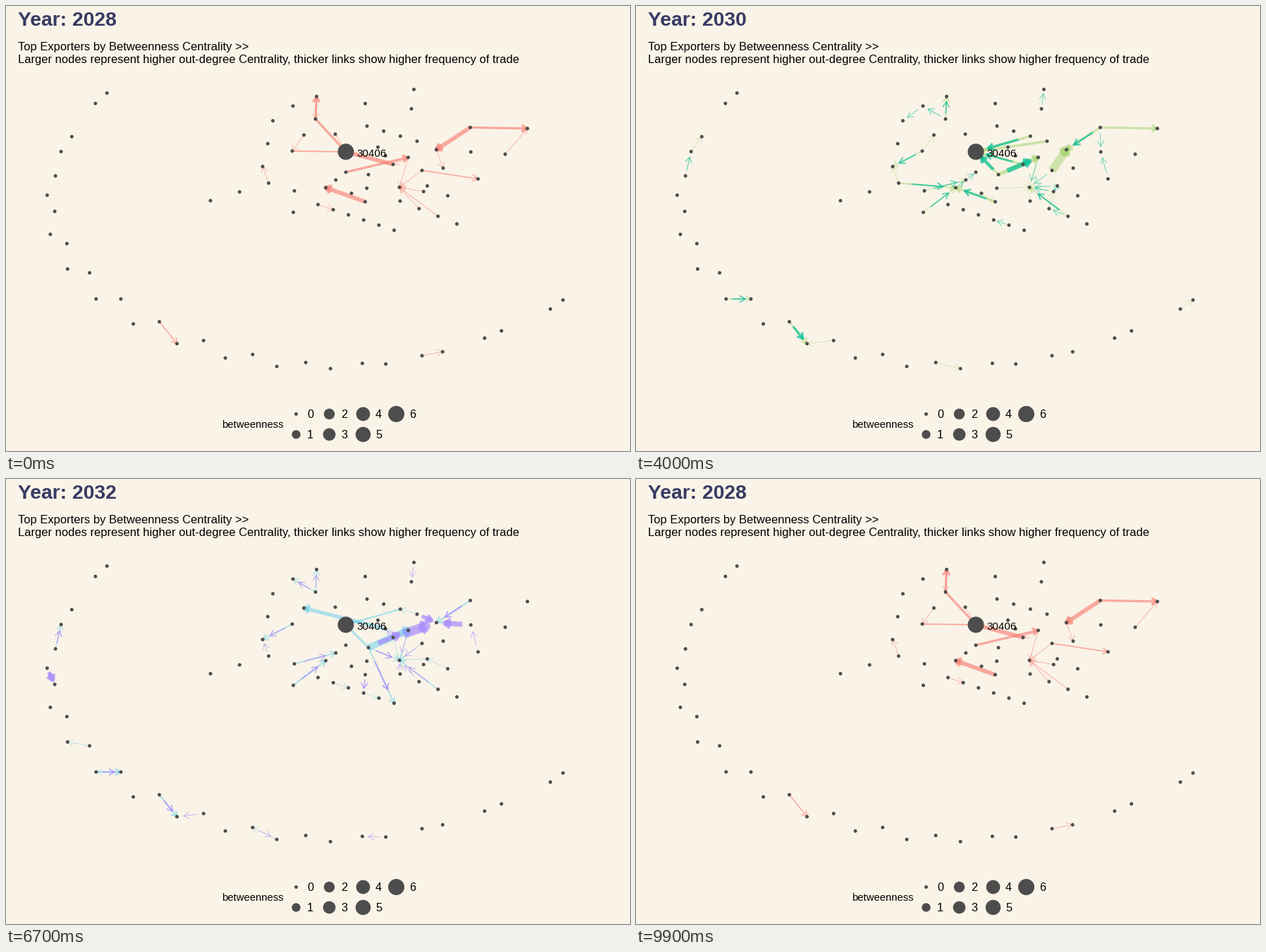
Animation, 885 px wide and 632 px high, one loop 10 s. Source, as a matplotlib script:

```python
import numpy as np
import matplotlib.pyplot as plt
from matplotlib.animation import FuncAnimation
from matplotlib.collections import LineCollection
from matplotlib.colors import to_rgba

W, H = 885, 632
BG, DOT, NAVY = "#faf3e7", "#4d4d4d", "#373a63"
HUES = ["#F8766D", "#C49A00", "#53B400", "#00C094", "#00B6EB", "#A58AFF", "#FB61D7"]
YEARS = range(2028, 2035)
ALPHA, BARB, THIN = 0.6, 9.4, 0.8


def arc(pairs=15):
    """Pairs of traders along a smooth curve, each turned a little further."""
    keys = [0, 3, 7, 11, 14]
    through = [(135, 131), (66, 308), (230, 464), (522, 508), (781, 424)]
    i = np.arange(pairs)
    coef = np.polyfit(keys, through, 4)
    mid = np.column_stack([np.polyval(c, i) for c in coef.T])
    turn = np.radians(138 - 12.4 * i)
    reach = 11 + 9 * np.sin(np.pi * i / (pairs - 1))
    half = reach[:, None] * np.column_stack([np.cos(turn), np.sin(turn)])
    return np.stack([mid - half, mid + half], axis=1).reshape(-1, 2)


def row(n, start, end):
    return np.linspace(start, end, n)


# Traders 0-29 form the arc, the rest the cluster
NODES = np.vstack([
    arc(),
    row(3, (290, 276.5), (372.5, 251.5)),    # 30
    row(3, (406, 206), (439, 160.5)),        # 33
    row(3, (364, 228), (378.5, 163)),        # 36
    row(2, (407, 142), (440.5, 128.5)),      # 39
    row(4, (512, 170.5), (583, 192)),        # 41
    row(3, (527.5, 200.5), (549, 225)),      # 45
    row(3, (482, 236), (453.5, 258)),        # 48
    row(3, (514, 239.5), (509.5, 278)),      # 51
    row(6, (442.5, 282), (550.5, 318.5)),    # 54
    row(4, (559, 277), (639.5, 309.5)),      # 60
    row(2, (590, 233.5), (597.5, 255.5)),    # 64
    row(3, (610.5, 204), (708, 210.5)),      # 66
    row(2, (658.5, 172.5), (739.5, 174)),    # 69
    row(2, (575, 146), (578.5, 118.5)),      # 71
    row(2, (409, 262.5), (407.5, 293)),      # 73
    row(2, (467, 182), (482, 207)),          # 75
    row(3, (570.5, 215), (669.5, 245.5)),    # 77
    row(3, (558, 257.5), (626.5, 269.5)),    # 80
    row(2, (509.5, 138.5), (490, 266)),      # 83
])
HUB, MARKET = 76, 80

# Importer: (exporter, peak year, width at the peak, years either side)
TRADES = {
    HUB: [(35, 2028, 3.3, 1), (47, 2028, 5.8, 3), (43, 2030.5, 4, 1.5),
          (51, 2031, 4.5, 1), (44, 2030, 3.7, 0), (33, 2028, 1.8, 1)],
    66: [(69, 2028, 5.8, 6), (67, 2034, 10, 1), (64, 2030, 11.5, 0),
         (47, 2033, 13, 0), (44, 2033, 5.5, 0)],
    70: [(69, 2029, 4.5, 1)],
    50: [(53, 2028, 5.8, 3), (74, 2032, 2.2, 2), (32, 2030.5, 2.3, 0.5)],
    49: [(73, 2032, 1.8, 2)],
    77: [(48, 2028, 3.3, 1), (51, 2032, 9.5, 2)],
    MARKET: [(62, 2031, 2, 3), (51, 2033, 1.6, 1)],
    34: [(46, 2032, 5.3, 0)],
    40: [(35, 2028, 3.3, 5)],
    39: [(35, 2032.5, 1.6, 1.5)],
    36: [(33, 2031.5, 2.2, 1.5)],
    59: [(51, 2032.5, 2.4, 0.5)],
    57: [(53, 2034, 2.3, 1)],
    79: [(64, 2028, 1.6, 1)],
    15: [(14, 2031, 3.2, 3)],
    12: [(11, 2032, 2.4, 3)],
    3: [(4, 2032.5, 1.7, 1.5)],
    6: [(5, 2033, 5.5, 0)],
}


def neighbours(a, count):
    gaps = np.hypot(*(NODES - NODES[a]).T)
    return np.argsort(gaps)[1:count + 1]


def links(year):
    """Main trades swell towards their peak; small ones join neighbours."""
    found = {}
    for to, sellers in TRADES.items():
        for seller, peak, width, span in sellers:
            away = abs(year - peak)
            if away <= span:
                found[seller, to] = width / (1 + 0.4 * away)
    rng = np.random.default_rng(year)
    for seller in rng.choice(neighbours(MARKET, 8), 4, replace=False):
        found.setdefault((seller, MARKET), THIN)
    for seller in rng.choice(len(NODES), 9, replace=False):
        if seller != HUB:
            found.setdefault((seller, neighbours(seller, 1)[0]), THIN)
    return found


LINKS = [links(year) for year in YEARS]

# First frame and number of steps of each change of year
CHANGES = [(6, 9), (21, 9), (36, 9), (50, 8), (64, 8), (78, 8), (92, 8)]


def show(layer, i, scale, alpha):
    """Shafts and open heads, scaled about the middle of each link."""
    lines, widths = [], []
    for (a, b), width in LINKS[i].items():
        mid, half = (NODES[a] + NODES[b]) / 2, (NODES[b] - NODES[a]) / 2 * scale
        tail, tip = mid - half, mid + half
        back = np.arctan2(-half[1], -half[0])
        left, right = (tip + BARB * np.array([np.cos(back + s), np.sin(back + s)])
                       for s in (-np.pi / 6, np.pi / 6))
        lines += [[tail, tip], [left, tip, right]]
        widths += [width, width]
    layer.set_segments(lines)
    layer.set_linewidth(widths)
    layer.set_color(to_rgba(HUES[i], alpha))


def timeline(frame):
    """Old year, new year, progress and the year nearest in time."""
    now = 0
    for i, (start, steps) in enumerate(CHANGES):
        after = (i + 1) % len(YEARS)
        k = frame - start
        if 0 <= k < steps:
            return i, after, (k + 1) / steps, after if k / (steps - 1) > 0.5 else i
        if k >= steps:
            now = after
    return now, now, 1, now


# At 72 dpi a point is a pixel
fig = plt.figure(figsize=(W / 72, H / 72), dpi=72, facecolor=BG)
ax = fig.add_axes([0, 0, 1, 1])
ax.set(xlim=(0, W), ylim=(H, 0))
ax.axis("off")


def label(x, y, text, size, **kw):
    return ax.text(x, y, text, family="Liberation Sans", size=size, va="baseline",
                   zorder=5, **kw)


def radius(betweenness):
    return 2.5 + 9 * np.sqrt(betweenness / 6)


def dots(xy, betweenness):
    x, y = np.transpose(xy)
    ax.scatter(x, y, s=(2 * radius(betweenness)) ** 2, c=DOT, linewidths=0, zorder=4)


leaving, entering = (
    ax.add_collection(LineCollection([], capstyle="butt", joinstyle="round", zorder=z),
                      autolim=False)
    for z in (2, 3))

dots(NODES, np.where(np.arange(len(NODES)) == HUB, 6, 0))
label(497.5, 213.5, "30406", 15.1)

title = label(17, 28, "", 28.2, weight="bold", color=NAVY)
label(17, 63, "Top Exporters by Betweenness Centrality >>", 16.5)
label(17, 81, "Larger nodes represent higher out-degree Centrality, "
              "thicker links show higher frequency of trade", 16.5)

label(306, 599, "betweenness", 14.9)
for n in range(7):
    col, line = divmod(n, 2)
    x, y = 410.5 + 47.5 * col, 579 + 29 * line
    dots([(x, y)], n)
    label(x + 16.5 + col, y + 6, str(n), 16.2)


def draw(frame):
    old, new, t, near = timeline(frame)
    show(leaving, old, 1, ALPHA * (1 - t))
    show(entering, new, t, ALPHA + 0.2 * (1 - t))
    title.set_text(f"Year: {YEARS[near]}")
    return leaving, entering, title


anim = FuncAnimation(fig, draw, frames=100, interval=100, repeat=True, repeat_delay=0)
plt.show()
```
